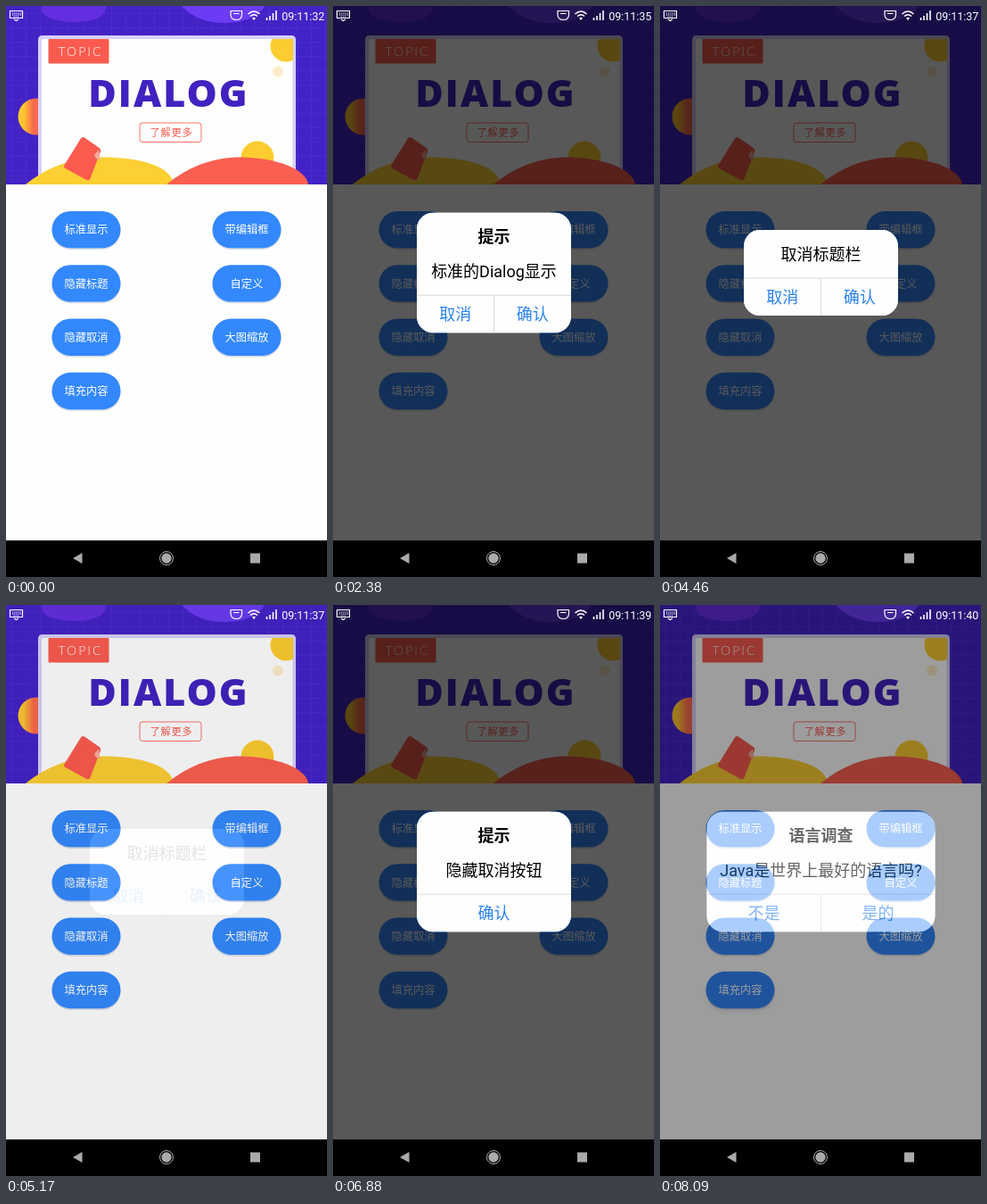
These frames come from a looping animation (360 px wide and 640 px high, 8.13 s). An HTML page:

```html
<!DOCTYPE html>
<html lang="zh-CN">
<head>
<meta charset="utf-8">
<title>Dialog</title>
<style>
html, body { margin: 0; height: 100%; overflow: hidden; background: #fefefe }
svg { display: block; width: 360px; height: 640px; font-family: Roboto, "Noto Sans CJK SC", "Noto Sans CJK", sans-serif }
text { text-anchor: middle }
.button { font-size: 12.3px; fill: #fff }
.dialog { font-size: 18px }
.blue { fill: #2b83f0 }
</style>
</head>
<body>
<svg viewBox="0 0 360 640">
  <defs>
    <pattern id="grid" width="16" height="16" x="6" y="8" patternUnits="userSpaceOnUse">
      <path d="M.5 0V16M0 .5H16" stroke="#4c2dcd" stroke-width=".8"/>
    </pattern>
    <linearGradient id="ball"><stop offset=".15" stop-color="#fcc62f"/><stop offset=".42" stop-color="#fc6a4c"/></linearGradient>
    <clipPath id="card"><path d="M40 37H322V200H40Z"/></clipPath>
    <filter id="soft" x="-30%" y="-30%" width="160%" height="170%"><feGaussianBlur stdDeviation="2.5"/></filter>
  </defs>

  <rect width="360" height="640" fill="#fefefe"/>

  <g id="banner">
    <rect width="360" height="200" fill="#4322c6"/>
    <rect width="360" height="200" fill="url(#grid)"/>
    <path d="M40 0C38 12 52 17 76 18C98 18 113 12 112 0Z" fill="#632ee0"/>
    <path d="M197 0C208 12 224 19 245 19C266 19 284 12 290 0Z" fill="#6b3cf4"/>
    <circle cx="34" cy="124" r="20.5" fill="url(#ball)"/>
    <path d="M36 200V38Q36 33 41 33H320Q325 33 325 38V200Z" fill="#d6d0f7"/>
    <path d="M40 200V39Q40 37 42 37H319Q321.500 37 321.500 39V200Z" fill="#fefefe"/>
    <g clip-path="url(#card)">
      <circle cx="314" cy="45" r="17.500" fill="#fccc30"/>
      <circle cx="305" cy="73.500" r="6" fill="#fcedc9"/>
    </g>
    <rect x="47.500" y="37" width="68" height="27.500" rx="1" fill="#fb5b4f"/>
    <text x="83.500" y="56" font-size="14" letter-spacing="2" font-weight="300" fill="#fff" font-family="Lato, sans-serif">TOPIC</text>
    <text x="182.500" y="113.300" font-size="43" letter-spacing="2.100" font-weight="800" fill="#4122c0" font-family="'Open Sans', sans-serif">DIALOG</text>
    <rect x="150" y="131" width="69" height="21.500" rx="3" fill="none" stroke="#fb7368"/>
    <text x="185.500" y="146" font-size="11.200" letter-spacing=".8" fill="#fb5b4f">了解更多</text>
    <circle cx="282" cy="170" r="18.500" fill="#fccc30"/>
    <path d="M22 200C45 181 75 169.500 107 169.500C148 169.500 186 179 188 200Z" fill="#fccf33"/>
    <path d="M180 200C205 179 234 169.500 262 169.500C304 170 337 183 339 200Z" fill="#fb5f50"/>
    <path d="M86.500 150.500L103 162L91.500 192L68.500 179.500Z" fill="#fb5b4f" stroke="#fb5b4f" stroke-width="6.500" stroke-linejoin="round"/>
    <path d="M99 167L104 161L105.500 172Q101 173 99 167Z" fill="#fcac9c"/>
  </g>

  <g id="buttons"></g>
  <path id="dim" fill-rule="evenodd"/>
  <g id="dialogs"></g>

  <g id="status" fill="none" stroke="#fff" stroke-width="1.200">
    <path d="M4.500 5.500H18.500V13.500H4.500ZM9 15L11.500 16.500L14 15"/>
    <path d="M7 8H17M7 10H17M8.500 12H15" stroke-dasharray="1.200 1"/>
    <path d="M252 5.500H264.500V10Q264 15.500 258.300 15.500Q252.500 15.500 252 10ZM255 8.500H261.500"/>
    <path d="M271.500 9Q278 3 284.500 9M274 11.500Q278 8 282 11.500" stroke-width="1.600"/>
    <path d="M276 13.500Q278 12 280 13.500L278 16Z" fill="#fff" stroke="none"/>
    <path d="M292.500 16V13M296 16V11M299.500 16V8M303 16V5" stroke-width="1.600"/>
    <text id="clock" x="333.300" y="15.700" font-size="12.500" fill="#fff" stroke="none"></text>
  </g>
  <g id="nav">
    <rect y="599" width="360" height="41"/>
    <path d="M75 619L85.500 613V625Z" fill="#aaa"/>
    <circle cx="180" cy="619" r="5.700" fill="#aaa"/>
    <circle cx="180" cy="619" r="7.500" fill="none" stroke="#aaa"/>
    <rect x="274" y="613.500" width="11" height="11" fill="#aaa"/>
  </g>
</svg>
<script>
const LOOP = 8130, FADE = 220, DIM = 0.65, PRESS = 130;
const byId = id => document.getElementById(id);
const text = (x, y, label, attrs = '') => `<text x="${x}" y="${y}" ${attrs}>${label}</text>`;

const labels = ['标准显示', '带编辑框', '隐藏标题', '自定义', '隐藏取消', '大图缩放', '填充内容'];
byId('buttons').innerHTML = labels.map((label, i) => {
  const x = i % 2 ? 270 : 90, y = 250.6 + 60.3 * (i >> 1);
  const pill = (dy, attrs) =>
    `<rect x="${x - 38.5}" y="${y - 20.7 + dy}" width="77" height="41.400" rx="20.700" ${attrs}/>`;
  return `<g class="button">
    ${pill(4, 'class="lift" fill="#446" filter="url(#soft)" opacity="0"')}
    ${pill(1.6, 'fill="#d3d8e4"')}${pill(0, 'fill="#3388fe"')}
    ${text(x, y + 4.6, label)}</g>`;
}).join('');
const lifts = document.querySelectorAll('.lift');

const dialogs = [
  { button: 0, open: 1800, close: 2850, title: '提示', body: '标准的Dialog显示', actions: ['取消', '确认'] },
  { button: 2, open: 3900, close: 5020, body: '取消标题栏', actions: ['取消', '确认'] },
  { button: 4, open: 5980, close: 7220, title: '提示', body: '隐藏取消按钮', actions: ['确认'] },
  { button: 6, open: 8012, close: LOOP, title: '语言调查', body: 'Java是世界上最好的语言吗?',
    actions: ['不是', '是的'], width: 256 }
];

function roundRect(x, y, w, h, r) {
  const arc = (dx, dy) => `a${r} ${r} 0 0 1 ${dx} ${dy}`;
  return `M${x + r} ${y}h${w - 2 * r}${arc(r, r)}v${h - 2 * r}${arc(-r, r)}` +
    `h${2 * r - w}${arc(-r, -r)}v${2 * r - h}${arc(r, -r)}z`;
}

byId('dialogs').innerHTML = dialogs.map(d => {
  const { width = 173, title, actions } = d;
  const left = 180.5 - width / 2, height = title ? 134.5 : 96;
  const top = 299 - height / 2, bottom = top + height, line = bottom - 42;
  d.outline = roundRect(left, top, width, height, 18);
  const cell = width / actions.length;
  const split = actions.length > 1 ? `M180.500 ${line}V${bottom}` : '';
  return `<g class="dialog">
    <path d="${d.outline}" fill="#fefefe"/>
    <path d="M${left} ${line}h${width}${split}" stroke="#d6dce0" fill="none"/>
    ${title ? text(180.5, top + 33, title, 'font-weight="700"') : ''}
    ${text(180.5, line - 20.3, d.body)}
    ${actions.map((a, i) => text(left + cell * (i + 0.5), bottom - 14.3, a, 'class="blue"')).join('')}
  </g>`;
}).join('');
const panels = document.querySelectorAll('.dialog');

const clamp = v => Math.max(0, Math.min(1, v));
const easeOut = v => 1 - (1 - clamp(v)) ** 2;

function draw(t) {
  let dimPath = '', dim = 0;
  dialogs.forEach((d, i) => {
    const shown = easeOut((t - d.open) / FADE) - easeOut((t - d.close) / FADE);
    panels[i].setAttribute('opacity', shown);
    panels[i].style.display = shown > 0 ? '' : 'none';
    if (shown > 0) {
      dim = shown * DIM;
      dimPath = 'M0 0H360V599H0Z' + d.outline;
    }
    const pressed = clamp((t - d.open + PRESS) / 60) * clamp((d.open + 120 - t) / 120);
    lifts[d.button].setAttribute('opacity', 0.25 * pressed);
  });
  byId('dim').setAttribute('d', dimPath);
  byId('dim').setAttribute('opacity', dim);
  byId('clock').textContent = '09:11:' + (32 + Math.floor((t + 720) / 1000));
}

const start = performance.now();
function tick() {
  draw((performance.now() - start) % LOOP);
  requestAnimationFrame(tick);
}
tick();
</script>
</body>
</html>
```
